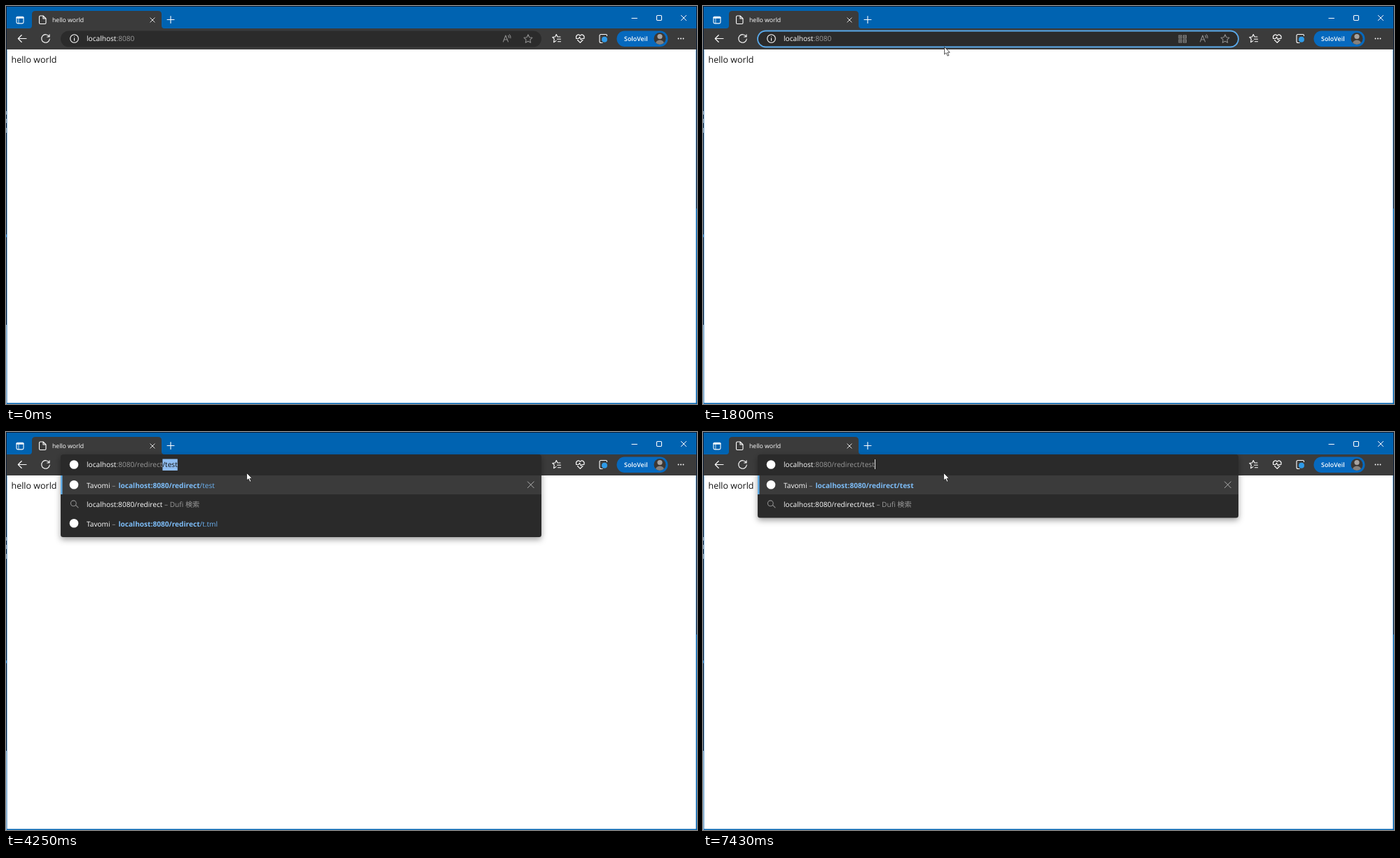
Recreate the animation shown at these times as an HTML page. Size 986 by 568 pixels, loop 8 s.

```html
<!DOCTYPE html>
<html lang="en">
<head>
<meta charset="utf-8">
<title>Address bar</title>
<style>
html, body { margin: 0; width: 100%; height: 100%; overflow: hidden; background: #fff; }
svg { display: block; width: 986px; height: 568px; }
text { font: 10.15px "Open Sans", "Noto Sans CJK JP", "Noto Sans CJK", sans-serif; white-space: pre; text-rendering: geometricPrecision; fill: #fff; }
.line { fill: none; stroke: #fff; stroke-width: 1.1; stroke-linecap: round; stroke-linejoin: round; }
.dim { stroke: #8c8c8c; }
.gray { fill: #9a9a9a; }
.url { fill: #6cb2f2; }
.hit { fill: #7dbdf8; font-weight: 700; }
.picked { fill: #101010; }
</style>
</head>
<body>
<svg viewBox="0 0 986 568">
  <defs>
    <filter id="shadow" x="-5%" y="-20%" width="110%" height="150%">
      <feDropShadow dx="0" dy="3.5" stdDeviation="4" flood-color="#000" flood-opacity=".38"/>
    </filter>
    <clipPath id="face"><circle cx="933" cy="46.5" r="8.5"/></clipPath>
    <path id="star" d="M0-6 1.8-2.1 6-1.6 2.9 1.3 3.7 5.5 0 3.4-3.7 5.5-2.9 1.3-6-1.6-1.8-2.1z"/>
    <g id="globe"><circle r="5.8"/><ellipse rx="2.6" ry="5.8"/><path d="M-5.4-2H5.4M-5.4 2H5.4"/></g>
    <path id="cross" d="M-4-4 4 4M4-4-4 4"/>
  </defs>

  <!-- window frame -->
  <rect width="986" height="568" fill="#0063b1"/>
  <path d="M0 0H986V1H0zM0 0H1V455H0zM985 0H986V289H985z" fill="#0b1c33"/>
  <path d="M0 455H1V568H0z" fill="#9db9d2"/>
  <path d="M0 150H1V155H0zM0 161H1V167H0zM0 174H1V181H0z" fill="#9aa6b5"/>
  <rect y="326" width="1" height="4" fill="#2b7cc4"/>
  <rect x="1.5" y="62" width="983" height="504.5" fill="#fff"/>
  <rect x="1" y="32" width="984" height="30" fill="#3b3b3b"/>
  <path d="M33 32q4 0 4-4V12q0-5 5-5H217q5 0 5 5V28q0 4 4 4z" fill="#3b3b3b"/>
  <text x="66" y="23" style="font-size:8.7px">hello world</text>
  <text x="7.5" y="81" style="font-size:12.5px;fill:#111">hello world</text>

  <!-- title bar and toolbar icons -->
  <g class="line">
    <rect x="15" y="15.3" width="10" height="9.6" rx="1.8"/>
    <path d="M15.5 16.6H24.5" stroke-width="2.2"/><path d="M18 17.5V24.5" stroke-width=".8"/>
    <path d="M53 14H49q-1.5 0-1.5 1.5V24q0 1.5 1.5 1.5H55.500q1.500 0 1.500-1.500V18L53 14V18H57"/>
    <use href="#cross" transform="translate(209 20) scale(.78)"/>
    <path d="M235 14.500V24.500M230 19.500H240"/>
    <path d="M893 17.500H900.500"/><rect x="928.500" y="13.500" width="7" height="7" rx="1.200"/>
    <use href="#cross" transform="translate(967 17) scale(.9)"/>
    <path d="M29 46.500H17.500M22.300 41.500 17.300 46.500 22.300 51.500"/>
    <path d="M61.500 43.500A5.800 5.800 0 1 0 62.300 47M62 40.800V44H58.700"/>
    <path d="M782.300 47 779.800 44.600 783.600 44 785.300 40.600 787 44H791M782.300 47 781.600 51.700 785 49.600M786.500 47.300H791.500M787.500 50.700H791.500"/>
    <path d="M813.800 46C812.300 42 817 39 819.300 42.500 821.600 39 826.300 42 824.800 46M815.500 48.500 819.300 52.300 823.100 48.500M813.500 46.500H817L818.500 44.300 820.500 48.300 821.700 46.500H825"/>
    <path d="M857.500 42.500V42q0-1.500-1.500-1.500H849q-2 0-2 2V50.500q0 2 2 2H851"/>
  </g>
  <circle cx="854" cy="47.800" r="4" fill="#2f9be8"/>
  <rect x="871.500" y="35.500" width="73" height="22.500" rx="11.250" fill="#0669be"/>
  <text x="882" y="49.600" style="font-size:8.900px;font-weight:600">SoloVeil</text>
  <g clip-path="url(#face)">
    <rect x="924" y="37" width="18" height="19" fill="#3c3733"/>
    <circle cx="933" cy="43.500" r="3.600" fill="#a7a3a0"/>
    <ellipse cx="933" cy="54" rx="6" ry="5.500" fill="#85817e"/>
  </g>
  <path d="M959.500 46.500h.01M963 46.500h.01M966.500 46.500h.01" class="line" stroke-width="2" style="stroke-width:1.900"/>

  <!-- address bar -->
  <g id="bar">
    <rect id="pill" x="78" y="35.500" width="686" height="23" rx="11.500" fill="#2b2b2b"/>
    <g class="line"><circle cx="97.500" cy="46.500" r="5.800"/><path d="M97.500 46V49.300M97.500 43.700v.01"/></g>
    <g class="line dim">
      <path d="M709.500 51 713 42 716.500 51M710.700 48H715.300M716.500 42.300q1.500 1.200 1.200 3.200M718.300 40.800q2.300 2 1.700 5"/>
      <use href="#star" x="745" y="46.800"/>
    </g>
    <g id="grid" fill="#8c8c8c"></g>
  </g>

  <g id="menu">
    <rect id="panel" x="78" y="32" width="686" rx="3.500" fill="#2b2b2b" filter="url(#shadow)"/>
    <rect x="78" y="62" width="686" height="27" fill="#3b3b3b"/>
    <rect x="78" y="62" width="2.500" height="27" fill="#63ace5"/>
    <g id="rows"></g>
  </g>
  <rect id="mark" y="38.500" height="16.500" fill="#8fbdf0"/>
  <text id="address" x="115" y="50.400"></text>
  <rect id="caret" y="39" width="1" height="14" fill="#e8e8e8"/>

  <path id="beam" d="M-3-6.500Q-.5-6.500 0-5.500.5-6.500 3-6.500M0-5.500V5.500M-3 6.500Q-.5 6.500 0 5.500.5 6.500 3 6.500" class="line" stroke-width="1"/>
  <path id="arrow" d="M.5.500V11L3 8.800 5 13.200 6.800 12.400 4.900 8.200H8.200z" fill="#fff" stroke="#111" stroke-width=".7"/>
</svg>
<script>
const LOOP = 8000, HOST = "localhost", PORT = ":8080", PATH = "/redirect/test";
const $ = id => document.getElementById(id);

// time, kind, x, y
const pointer = [
  [0, ""], [200, "arrow", 295, 99], [380, "arrow", 283, 78],
  [600, "beam", 277, 55], [790, "beam", 275.5, 55], [980, "beam", 361, 56],
  [1200, "beam", 356, 54.5], [1390, "beam", 354, 54.5], [1610, "beam", 350.5, 56],
  [1800, "arrow", 344, 58], [2400, "arrow", 343, 58]
];
// time, mode, letters of the path typed, caret shown
const typing = [
  [0, "rest", 0, 0], [600, "all", 0, 0], [980, "edit", 0, 1], [1610, "edit", 0, 0],
  [1990, "hint", 3, 0], [2210, "hint", 4, 0], [2620, "hint", 5, 0], [3430, "hint", 6, 0],
  [3840, "hint", 7, 0], [4030, "hint", 8, 0], [4250, "hint", 9, 0],
  [5030, "bare", 9, 1], [5650, "bare", 9, 0], [6240, "hint", 10, 0],
  [6430, "hint", 12, 0], [6650, "hint", 14, 1], [7240, "hint", 14, 0], [7430, "hint", 14, 1]
];

const at = (track, t) => track.filter(step => step[0] <= t).pop();
const span = (cls, text, x) => `<tspan class="${cls}"${x ? ` x="${x}"` : ""}>${text}</tspan>`;
const show = (id, on) => $(id).setAttribute("display", on ? "inline" : "none");
const dot = y => `<circle cx="97" cy="${y}" r="6.3" fill="#fff"/>`;
const globe = (y, cls) => `<g class="line ${cls}"><use href="#globe" x="97.300" y="${y}"/></g>`;
const lens = y => `<path class="line dim" d="M99.500 ${y + 1.500}L103 ${y + 5}M100.200 ${y - 1}a3.900 3.900 0 1 0-7.800 0a3.900 3.900 0 1 0 7.800 0"/>`;

function menuRows(mode, n) {
  const typed = HOST + PORT + PATH.slice(0, n);
  const site = path => [dot, span("", "Tavomi") + span("gray", " – ") +
    span("hit", typed, 160.4) + span("url", path.slice(n))];
  const search = [lens, span("", typed) + span("gray", " – Dufi 検索")];
  if (mode === "bare")
    return [[y => globe(y, "dim"), span("hit", typed)], search, site(PATH), site("/redirect/t.tml")];
  return n > 10 ? [site(PATH), search] : [site(PATH), search, site("/redirect/t.tml")];
}

function drawMenu(mode, n) {
  const rows = menuRows(mode, n);
  $("panel").setAttribute("height", 35.5 + 27.5 * rows.length);
  let out = mode === "bare" ? globe(46.5, "") : dot(46.5);
  rows.forEach(([icon, text], i) => {
    const y = 75.3 + 27.5 * i;
    out += icon(y) + `<text x="115" y="${y + 4.3}">${text}</text>`;
  });
  if (mode === "hint")
    out += '<use href="#cross" class="line" transform="translate(748.800 75.300) scale(1.100)" style="stroke:#b0b0b0;stroke-width:.9"/>';
  $("rows").innerHTML = out;
}

function drawAddress(mode, n, caret) {
  const address = $("address"), base = HOST.length + PORT.length;
  const all = mode === "all", rest = mode === "hint" ? PATH.slice(n) : "";
  address.innerHTML = all ? span("picked", HOST + PORT)
    : span("", HOST) + span("gray", PORT + PATH.slice(0, n)) + span("picked", rest);
  const end = i => address.getEndPositionOfChar(i - 1).x;
  const from = all ? 115 : end(base + n);
  const to = all ? end(base) : end(base + n + rest.length);
  $("mark").setAttribute("x", from);
  $("mark").setAttribute("width", Math.max(0, to - from));
  $("caret").setAttribute("x", Math.round(from));
  show("caret", caret);
}

function drawField([, mode, n, caret]) {
  const open = n > 0, focus = mode !== "rest";
  show("menu", open);
  show("bar", !open);
  show("grid", focus);
  $("pill").setAttribute("stroke", focus ? "#5aa9ea" : "none");
  $("pill").setAttribute("stroke-width", 1.8);
  if (open) drawMenu(mode, n);
  drawAddress(mode, n, caret);
}

function drawPointer([, kind, x, y]) {
  for (const id of ["beam", "arrow"]) {
    show(id, id === kind);
    if (id === kind) $(id).setAttribute("transform", `translate(${x} ${y})`);
  }
}

for (const x of [678.5, 685])
  for (const y of [41.5, 47.5])
    $("grid").innerHTML += `<rect x="${x + .5}" y="${y + .5}" width="4" height="4" fill="none" stroke="#8c8c8c"/><rect x="${x + 1.7}" y="${y + 1.7}" width="1.600" height="1.600"/>`;

let field, spot;
function frame(now) {
  const t = now % LOOP, nextField = at(typing, t), nextSpot = at(pointer, t);
  if (nextField !== field) drawField(field = nextField);
  if (nextSpot !== spot) drawPointer(spot = nextSpot);
  requestAnimationFrame(frame);
}
frame(performance.now());
</script>
</body>
</html>
```
